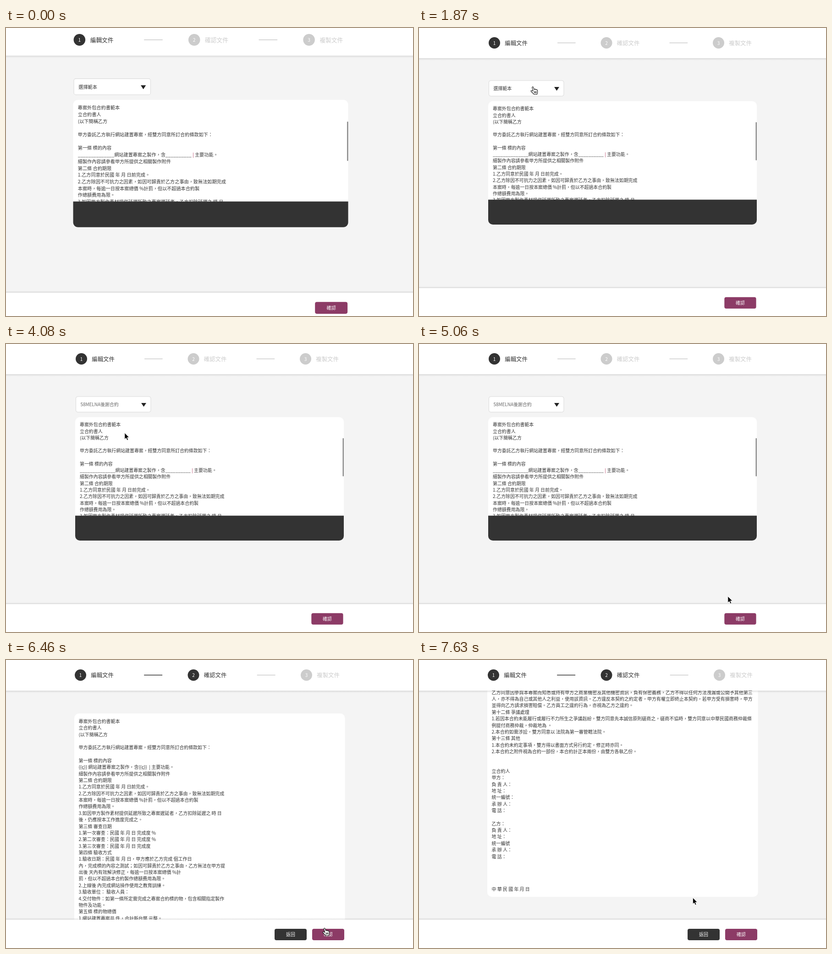
Write an HTML page that moves like this. It is 888 px wide and 630 px high and loops after 8000 ms.

```html
<!DOCTYPE html>
<html lang="zh-Hant-TW">
<head>
<meta charset="utf-8">
<title>合約編輯流程</title>
<style>
html, body { margin: 0; width: 100%; height: 100%; overflow: hidden; background: #f4f4f4; }
svg { display: block; width: 888px; height: 630px; }
text { font-family: "Noto Sans CJK TC", "Noto Sans CJK", "Noto Sans", sans-serif; white-space: pre; }
</style>
</head>
<body>
<svg viewBox="0 0 888 630">
  <defs>
    <linearGradient id="down" x2="0" y2="1"><stop stop-opacity=".11"/><stop offset="1" stop-opacity="0"/></linearGradient>
    <linearGradient id="up" x2="0" y2="1"><stop stop-opacity="0"/><stop offset="1" stop-opacity=".11"/></linearGradient>
    <g id="arrow">
      <path d="M.3 .3V14.6L3.5 11.6L5.7 16.6L8.2 15.5L6 10.6H10.4Z" stroke="#fff" stroke-width="1" stroke-linejoin="round"/>
    </g>
    <g id="hand" stroke="#111" stroke-width="1.1" stroke-linecap="round" stroke-linejoin="round">
      <path fill="#fff" d="M5.8 10.4L3.6 3.2C3 1 5.5 .1 6.3 2.2L7.9 6.9C8.3 5.6 10.3 5.6 10.6 7.1C11.1 6 12.8 6.2 13 7.6C13.7 6.9 15 7.3 15.1 8.9L15.4 12C15.5 14.4 14.4 15.2 14.4 17.3L7.4 17.5C6.8 15.5 3.4 13.6 1.3 10.9C.2 9.4 2 8.3 3.3 9.2Z"/>
      <path fill="none" d="M8.2 11.2L8.5 14.6M10.4 11L10.6 14.4M12.5 10.9L12.6 14.2"/>
    </g>
  </defs>
  <g id="stage"></g>
</svg>
<script>
const LOOP = 8000;
const DARK = '#333', PALE = '#ccc', PLUM = '#8c3b66';
const BLANK = '______________網站建置專案之製作，含__________ <tspan fill="#b0355a">|</tspan> 主要功能。';
const FILLED = '{{ç}} 網站建置專案之製作，含{{ç}}  | 主要功能。';
const TEMPLATES = ['58MELNA合約', '58MELNA後謝合約'];
const FIELD_LINE = 7;

const OPENING = `專案外包合約書範本
立合約書人
(以下簡稱乙方

甲方委託乙方執行網站建置專案，經雙方同意所訂合約條款如下：

第一條 標的內容
${FILLED}
細製作內容請參看甲方所提供之相關製作附件
第二條 合約期限
1.乙方同意於民國 年 月 日前完成。
2.乙方除因不可抗力之因素，如因可歸責於乙方之事由，致無法如期完成
本案時，每逾一日按本案總價 %計罰，但以不超過本合約製
作總額費用為限。
3.如因甲方製作素材提供延遲所致之專案遲延者，乙方扣除延遲之 時 日
後，仍應按本工作進度完成之。
第三條 審查日期
1.第一次審查：民國 年 月 日 完成度 %
2.第二次審查：民國 年 月 日 完成度 %
3.第三次審查：民國 年 月 日 完成度
第四條 驗收方式
1.驗收日期：民國 年 月 日，甲方應於乙方完成 個工作日
內，完成標的內容之測試；如因可歸責於乙方之事由，乙方無法在甲方提
出後 天內有效解決修正，每逾一日按本案總價 %計
罰，但以不超過本合約製作總額費用為限。
2.上線後 內完成網站操作使用之教育訓練。
3.驗收單位： 驗收人員：
4.交付物件：如第一條所定需完成之專案合約標的物，包含相關指定製作
物件及功能。
第五條 標的物總價
1.網站建置專案共 件，合計新台幣 元整。
2.其他
3.本案件結算金額共計新台幣 元整，實際支付金額為新台幣
元整`.split('\n');

const CLOSING = `乙方同意因參與本專案而知悉或持有甲方之商業機密及其他機密資訊，負有保密義務，乙方不得以任何方法洩漏或公開予其他第三
人，亦不得為自己或其他人之利益，使用該資訊。乙方違反本契約之約定者，甲方有權立即終止本契約，若甲方受有損害時，甲方
並得向乙方請求損害賠償。乙方員工之違約行為，亦視為乙方之違約。
第十二條 爭議處理
1.若因本合約未能履行或履行不力所生之爭議赳紛，雙方同意先本誠信原則磋商之，磋商不協時，雙方同意以中華民國商務仲裁條
例提付商務仲裁，仲裁地為 。
2.本合約如需涉訟，雙方同意以 法院為第一審管轄法院。
第十三條 其他
1.本合約未約定事項，雙方得以書面方式另行約定，修正時亦同。
2.本合約之附件視為合約一部份，本合約計正本兩份，由雙方各執乙份。


立合約人
甲方：
負 責 人：
地 址：
統一編號：
承 辦 人：
電 話：

乙方：
負 責 人：
地 址：
統一編號
承 辦 人：
電 話：




中 華 民 國 年 月 日`.split('\n');

// [start ms, pointer, x, y]
const POINTER = [
  [100, 'arrow', 673, 542], [390, 'arrow', 655.5, 542], [780, 'arrow', 292.5, 184],
  [1220, 'hand', 246, 125], [1870, 'hand', 243.3, 127.7], [2220, 'hand', 264.7, 140],
  [2640, 'arrow', 268.5, 140.5], [3670, 'hand', 256, 187], [4080, 'arrow', 258.5, 194],
  [4620, 'arrow', 261.5, 194.5], [5060, 'arrow', 673.5, 551.5], [5790, 'hand', 713.5, 601],
  [6460, 'hand', 690, 585.5], [6880, 'arrow', 597, 519.5]
];
const CUTS = [0, 3250, 5790, 7630, ...POINTER.map(p => p[0])].sort((a, b) => a - b);

const rect = (x, y, w, h, fill, rx = 0, extra = '') =>
  `<rect x="${x}" y="${y}" width="${w}" height="${h}" rx="${rx}" fill="${fill}" ${extra}/>`;

// y is the middle of the line of characters
const text = (x, y, size, fill, str, extra = '') =>
  `<text x="${x}" y="${y + size * 0.38}" font-size="${size}" fill="${fill}" ${extra}>${str}</text>`;

const paragraph = (lines, x, y, size, pitch) =>
  lines.map((line, i) => line && text(x, y + i * pitch, size, DARK, line)).join('');

const button = (x, y, w, fill, label) => rect(x, y, w, 25, fill, 4) +
  text(x + w / 2, y + 12.7, 9.95, '#fff', label, 'text-anchor="middle"');

function header(done, spacing, bottom) {
  const y = bottom / 2 - 0.5;
  const steps = ['編輯文件', '確認文件', '複製文件'].map((label, i) => {
    const x = 409 + (i - 1) * spacing, color = i < done ? DARK : PALE;
    const line = i < 2 ? rect(x + spacing * 0.5625, y - 0.75, spacing * 0.162, 1.5, i < done - 1 ? DARK : PALE) : '';
    return `<circle cx="${x}" cy="${y}" r="12.5" fill="${color}"/>` +
      text(x, y + 0.2, 10, '#fff', i + 1, 'text-anchor="middle"') +
      text(x + 22.8, y + 0.4, 12.4, color, label, 'font-weight="500"') + line;
  });
  return rect(-20, bottom, 940, 5, 'url(#down)') + rect(-20, -20, 940, bottom + 20, '#fff') + steps.join('');
}

const footer = top => rect(-20, top - 4, 940, 4, 'url(#up)') + rect(-20, top, 940, 90, '#fff');

function templateMenu() {
  return rect(152, 151, 164.5, 26, '#fff', 0, 'opacity=".94"') +
    rect(152, 176.5, 164.5, 25, '#f9f0f2', 0, 'opacity=".97"') +
    TEMPLATES.map((name, i) => text(162.5, 164.5 + i * 24.3, 9.92, '#707070', name)).join('');
}

function editPage(open, chosen) {
  const lines = OPENING.slice(0, 15);
  if (!open) lines[FIELD_LINE] = BLANK;
  const top = open ? 159 : 160, boxY = open ? 115.5 : 115;
  const ghost = open ? `<g opacity=".05">${text(161, 276.4, 9.92, DARK, BLANK)}</g>` : '';
  return rect(152.5, boxY, 163.5, 34, '#fff', 4, `stroke="${open ? '#8f5a68' : '#d9d9d9'}"`) +
    text(162.5, 132.2, 9.92, chosen ? '#666' : DARK, chosen ? TEMPLATES[1] : '選擇範本') +
    '<path d="M295 129H306L300.5 137.3Z" fill="#222"/>' +
    rect(151, top, 586, 430 - top, '#fff', 10) +
    paragraph(lines, 161, 176.5, 9.92, 14.27) + ghost +
    `<path d="M151 375.5H737V420a10 10 0 0 1-10 10H161a10 10 0 0 1-10-10Z" fill="${DARK}"/>` +
    rect(734.5, 206, 2.5, 83.5, '#8c8c8c', 1) +
    (open ? templateMenu() : '') +
    header(1, 244.5, 66) + footer(open ? 568 : 569) +
    (open ? button(584.5, 588, 69.5, '#3d3d3d', '還原步驟') : '') +
    button(666.3, open ? 588 : 588.7, 69.3, open ? '#93476e' : PLUM, '確認');
}

function confirmPage(t) {
  const atEnd = t >= 7630, top = atEnd ? -300 : t >= 6880 ? 77 : 117;
  const body = atEnd ? paragraph(CLOSING, 158.5, 71, 9.99, 14.35)
                     : paragraph(OPENING, 158.5, top + 17, 9.99, 14.36);
  return rect(149, top, 590.5, (atEnd ? 518 : 800) - top, '#fff', 10) + body +
    header(2, 246.5, 67) + footer(568) +
    button(586, 588, 70, DARK, '返回') + button(668, 588, 70, PLUM, '確認');
}

function scene(t) {
  if (t < 100) return `<g transform="matrix(1.024 0 0 1.0312 -8.1 -7.7)">${editPage(false, false)}</g>`;
  const page = t < 5790 ? editPage(t >= 3250 && t < 4080, t >= 4080) : confirmPage(t);
  const [, shape, x, y] = POINTER.filter(p => p[0] <= t).pop();
  return page + `<use href="#${shape}" x="${x}" y="${y}"/>`;
}

const stage = document.getElementById('stage');
let shown = -1;
function frame() {
  const t = performance.now() % LOOP;
  const cut = CUTS.filter(c => c <= t).pop();
  if (cut !== shown) stage.innerHTML = scene(shown = cut);
  requestAnimationFrame(frame);
}
frame();
</script>
</body>
</html>
```
